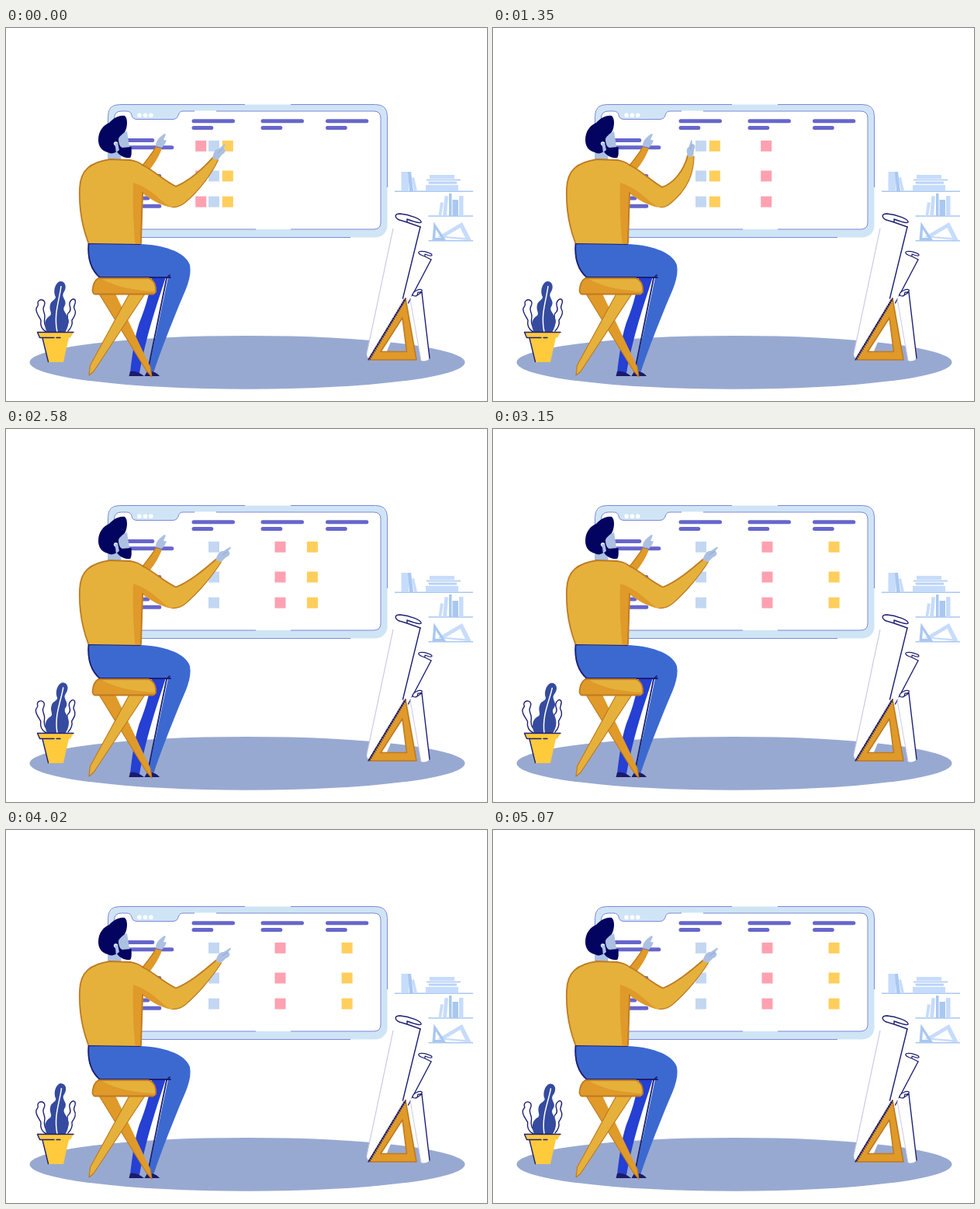
Write an HTML page that moves like this. It is 620 px wide and 480 px high and loops after 5.1 s.

```html
<!DOCTYPE html>
<html lang="en">
<head>
<meta charset="utf-8">
<title>Planning board</title>
<style>
html, body { margin: 0; width: 100%; height: 100%; overflow: hidden; background: #fff; }
svg { display: block; width: 620px; height: 480px; }
.ink { fill: none; stroke: #1c1f72; stroke-width: 1.4; stroke-linecap: round; stroke-linejoin: round; }
.seam { fill: none; stroke: #bf7a22; stroke-width: 1.8; stroke-linecap: round; stroke-linejoin: round; }
.thin { stroke-width: 1.2; }
.paper { fill: #fff; }
.light { fill: #e5b13b; }
.dark { fill: #df9a29; }
.skin { fill: #acc0e2; }
.navy { fill: #030360; }
.pale { fill: #c7dcfb; }
.mid { fill: #a9c8f0; }
</style>
</head>
<body>
<svg viewBox="0 0 620 480">
  <ellipse cx="311" cy="430.3" rx="280.5" ry="34.4" fill="#98a9d1"/>

  <!-- board -->
  <rect x="131.5" y="98.5" width="360" height="171" rx="15" fill="#cfe5f6"/>
  <g fill="none" stroke="#7f86d8">
    <path d="M308 98.5H146.5Q131.5 98.5 131.5 113.5V254.5Q131.500 269.5 146.5 269.5H444M367 98.5H476.5Q491.5 98.5 491.5 113.5V205"/>
    <path fill="#fff" stroke="none" d="M155 107H149Q139.5 107 139.5 116V250Q139.5 259 149 259H474Q483 259 483 250V116Q483 107 474 107H229Q223.5 107 222.5 111Q221 117.5 215 117.5H169Q163 117.5 162 112Q161 107 155 107Z"/>
    <path d="M243 107H229Q223.5 107 222.5 111Q221 117.5 215 117.5H169Q163 117.5 162 112Q161 107 155 107H149Q139.5 107 139.5 116V250Q139.5 259 149 259H322M271 107H474Q483 107 483 116V250Q483 259 474 259H367"/>
    <path stroke="#fff" d="M243 107H271"/>
  </g>
  <path d="M172 112.2h0m7.5 0h0m7.3 0h0" stroke="#fff" stroke-width="5.6" stroke-linecap="round"/>
  <path d="M242 119.8h50.5M242 128.5h22.800M331 119.8h50.5M331 128.5h22.8M414.5 119.8h50.3M414.5 128.5h22.8M155 144.5h33.8M155 153.8h58.8M160 190.5h37.8M160 219h22.8M160 229.3h37.8"
    fill="none" stroke="#6666cc" stroke-width="5" stroke-linecap="round"/>
  <g id="notes"></g>

  <!-- shelves -->
  <path d="M501 210.300H602M544.5 242H602M544.5 273.8H602" stroke="#a9c8f0" stroke-width="1.4"/>
  <path class="pale" d="M509.5 185H519V210H509.5ZM523 193L526 192L530 209.5L526 210ZM546 189H578V194H546ZM545 197.5H581V201H545ZM541 202H583V210H541ZM557.5 242L560 224L564 225L561 242ZM563 242L565.5 216L570 216.5L568 242ZM584 216H589.5V242H584Z"/>
  <path class="mid" d="M518 185L522 185L525 210L520 210ZM542 194.8H586V196.3H542ZM544 198H581V198.8H544ZM571 213H574.5V242H571ZM575.5 221H583V242H575.5Z"/>
  <path class="pale" fill-rule="evenodd" d="M556 269L588 250L600 273.5ZM567 268L592 270L585.5 257Z"/>
  <path class="mid" fill-rule="evenodd" d="M551.5 249.5L567 273H549.5ZM554 259L553.3 270H561Z"/>

  <!-- paper rolls -->
  <path class="paper" d="M502 244L534 256L496 404L490 418L470 427Q465 425 465 419L499 258Z"/>
  <path d="M499 258L465 419" stroke="#c9c9e6" stroke-width="1.2"/>
  <path class="ink paper" d="M534 256L517 250V246C525 249 533 252 535 250C536 246 520 240 508 239C500 239 501 244 507 247L517 250"/>
  <path class="ink" d="M534 256L511.500 348"/>
  <path class="paper" d="M534 292L548 298L519 354L512 352Z"/>
  <path class="ink" d="M548 298L518.500 354"/>
  <path class="ink paper thin" d="M548 298L540 294V291C545 293 549 294 549 292C549 290 540 287 534 287.500C530 288 532 291 536 292.500L540 294"/>
  <path class="paper" d="M521 346L536 340L546 425Q542 430 535 428Z"/>
  <path d="M521 349L535 428" stroke="#c9c9e6"/>
  <path class="ink" d="M536 340L546 425"/>
  <path class="ink paper thin" d="M536 340L530 344L531 340C535 341 537 338 536 337C533 335 525 339 524 343C525 346 529 345 530 344"/>
  <path class="dark" fill-rule="evenodd" stroke="#bf7a22" stroke-width="1.6" stroke-linejoin="round" d="M467.5 427L515 348L529 427ZM483 416.5H516.5L511 373Z"/>
  <path d="M468.5 426L514.5 349" stroke="#1c1f72" stroke-width="3.2" stroke-dasharray="1.2 1.8"/>
  <path class="ink" d="M467 427L515 348"/>

  <!-- plant -->
  <path id="leftLeaf" class="ink" d="M52 391C46 388 44 382 45 376C42 370 38 366 39 361C40 357 43 358 41 354C41 351 44 349 47 350C50 351 51 354 49 358C46 362 50 366 50 371C49 378 49 384 55 388"/>
  <path id="rightLeaf" class="ink" d="M80 390C84 386 86 381 85 376C89 370 91 366 88 361C86 358 91 354 89 350C87 347 83 350 82 354C81 358 85 361 82 365C78 368 79 372 80 376C81 381 78 385 76 388"/>
  <g id="midLeaf">
    <path fill="#354b9f" d="M53 392C48 382 50 374 57 370C60 367 55 363 57 356C58 351 64 350 64 346C60 338 64 327 70 326C77 326 79 334 74 341C71 347 79 350 76 357C71 364 79 366 80 375C81 382 79 387 76 392Z"/>
    <path d="M66 391C61 368 69 350 71 332" fill="none" stroke="#fff" stroke-width="1.5"/>
  </g>
  <path fill="#ffca3c" d="M40.5 391.5H87L83 398.5H81L74 430H54L47 398.5H43Z"/>
  <path class="ink" d="M87 391.5H40.5L43.5 398.5H62M65 398.5H70M47 399L54.5 429.5"/>

  <!-- legs and stool -->
  <path fill="#2540d2" d="M188 320H206C198 347 183 385 172 444H160C162 425 166 397 171 382C176 368 184 350 188 320Z"/>
  <path fill="#3c69d0" d="M106 277L173 278C200 279 231 287 237 305C240 321 231 338 223 357C213 382 201 411 190 444H183L209 321H122C109 312 104 297 106 277Z"/>
  <path class="ink" style="stroke-width:1.8" d="M173 278L106.5 277C105 297 109 311 121 321H212M211 318L207 322L183 440"/>
  <path fill="#1b1b6a" d="M158.5 448L160 442C167 441 173 444 178 448ZM178.5 448L182 442C189 441 195 444 198 448Z"/>
  <path class="dark" d="M120 342H141L186 436L188 449L181 441Z"/>
  <path class="seam thin" d="M120 342L181 441L188 449L186 436"/>
  <path class="light" d="M159 342H179L113 442L107 447L108.5 434Z"/>
  <path class="seam thin" d="M159 342L108.5 434L107 447L113 442L179 342"/>
  <path class="dark" d="M119 322H184C192 325 194 333 193 340Q192 343 188 343H116Q112 343 111.5 338C112 330 114 325 119 322Z"/>
  <path class="light" d="M122 322H184C192 325 194 333 193 339C168 338 142 334 122 322Z"/>
  <path class="seam" d="M190 342.5H116Q112 343 111.5 338C112 330 114 325 119 322H184C192 325 194 333 193 340"/>

  <!-- far arm -->
  <path class="dark" d="M170 184L174 179L193 153L201 155C197 166 189 179 180 188L170 192Z"/>
  <path class="seam thin" d="M174 179C181 171 188 163 193 153"/>
  <path class="skin" d="M193 152C193 145 197 142 199 140L204 136L206 137L203 144L207 144.5L205 149L201 154Z"/>

  <!-- head -->
  <path class="skin" d="M131 146H150L148 172H131ZM142 139L156 133L159 152L160 157H143Z"/>
  <path class="navy" d="M131 160C123 158 119 152 119 144C119 132 126 125 133 122C139 115 147 111.5 153 113C157 116 157 127 153 134C150 137 146 139 145 143C145 149 147 153 150 154L161.5 153C162 160 162 165 160 167C153 168 146 164 143 159C138 162 135 162 131 160Z"/>
  <path class="skin" d="M144 147C140 144 137 148 140 151C142 153 141 157 142 160L146 157Z"/>
  <path d="M144 148C140 146 138 149 141 151" fill="none" stroke="#fff"/>

  <!-- torso and near arm -->
  <path class="light" d="M106 277C98 255 94 230 95 206C96 183 108 173 134 169L162 170L186 182L177 210L174 278Z"/>
  <path class="dark" d="M164 198L190 200L214 231C200 229 186 220 176 213L174 278H166.5C164 250 163 225 164 198Z"/>
  <path class="seam" d="M176 212L174 277"/>
  <path class="light" id="arm"/>
  <path class="seam" d="M106 276C98 255 94 230 95 206C96 183 108 173 134 169L160 170C168 171 173 174 177 177"/>
  <path class="seam" id="armLine"/>
  <path class="seam thin" id="armEdge"/>
  <g id="hand">
    <path class="skin" d="M-4 0C-3 -7 1 -13 6 -12L14.5 -17.5L15.5 -16L12 -12C16 -9 13 -5 9 -4L3 2Z"/>
    <path d="M4 -7L12 -12" stroke="#8da3d2" stroke-width=".8"/>
  </g>
</svg>
<script>
const $ = id => document.getElementById(id);
const start = performance.now(), LOOP = 5100;
const clamp = x => Math.min(1, Math.max(0, x));
const smooth = x => x * x * (3 - 2 * x);
const ramp = (t, from, to) => clamp((t - from) / (to - from));
const lerp = (a, b, k) => a + (b - a) * k;

// Blend two paths that share the same commands.
function blend(a, b, k) {
  const ends = b.match(/-?[\d.]+/g);
  let i = 0;
  return a.replace(/-?[\d.]+/g, n => lerp(+n, +ends[i++], k).toFixed(2));
}

const topOut = 'M177 177C190 183 203 196 219 203.5C236 197 254 182 271 167.5';
const topIn = 'M177 177C190 183 203 196 218 205C232 200 245 185 249.5 163.5';
const underOut = 'L277.5 171C268 186 250 209 231 225C226 229 221 231 214 230.5';
const underIn = 'L257.5 164.5C258 186 251 205 236 219C228 227 222 232 215 230.5';
const shoulder = 'C203 228 190 207 164 199L150 172Z';

const columns = ['#ffa1b1', '#c3d7f2', '#ffce5c'].map(color => {
  const g = document.createElementNS('http://www.w3.org/2000/svg', 'g');
  g.innerHTML = [144.8, 183.5, 216.6].map(y =>
    `<rect y="${y}" width="14" height="14" fill="${color}"/>`).join('');
  return g;
});
const [pink, blue, yellow] = columns;
$('notes').append(blue, yellow, pink);

const place = (g, x) => g.setAttribute('transform', `translate(${x} 0)`);
const slide = (t, from) => smooth(ramp(t, from, from + 740) ** 1.7);
const tilt = (id, deg, x) => $(id).setAttribute('transform', `rotate(${deg} ${x} 391)`);

function draw() {
  const t = (performance.now() - start) % LOOP;

  place(pink, lerp(244.2, 346.5, slide(t, 640)));
  place(blue, 261);
  place(yellow, lerp(278.8, 432.6, slide(t, 2010)));

  const reach = t < 1200
    ? lerp(.2, 1, smooth(ramp(t, 0, 780)))
    : 1 - smooth(ramp(t, 1200, 2100));
  const top = blend(topOut, topIn, reach);
  const under = blend(underOut, underIn, reach);
  $('arm').setAttribute('d', top + under + shoulder);
  $('armLine').setAttribute('d', top);
  $('armEdge').setAttribute('d', under.replace('L', 'M'));
  $('hand').setAttribute('transform',
    `translate(${lerp(274.5, 253.5, reach)} ${lerp(169, 164, reach)}) rotate(${-42 * reach}) scale(${lerp(1, .88, reach)})`);

  const sway = t < 2160 ? 0 : (1 - Math.cos((t - 2160) / 1700 * 2 * Math.PI)) / 2;
  tilt('midLeaf', 5.6 * sway, 65);
  tilt('leftLeaf', -2 * sway, 52);
  tilt('rightLeaf', -2 * sway, 80);

  requestAnimationFrame(draw);
}
draw();
</script>
</body>
</html>
```
